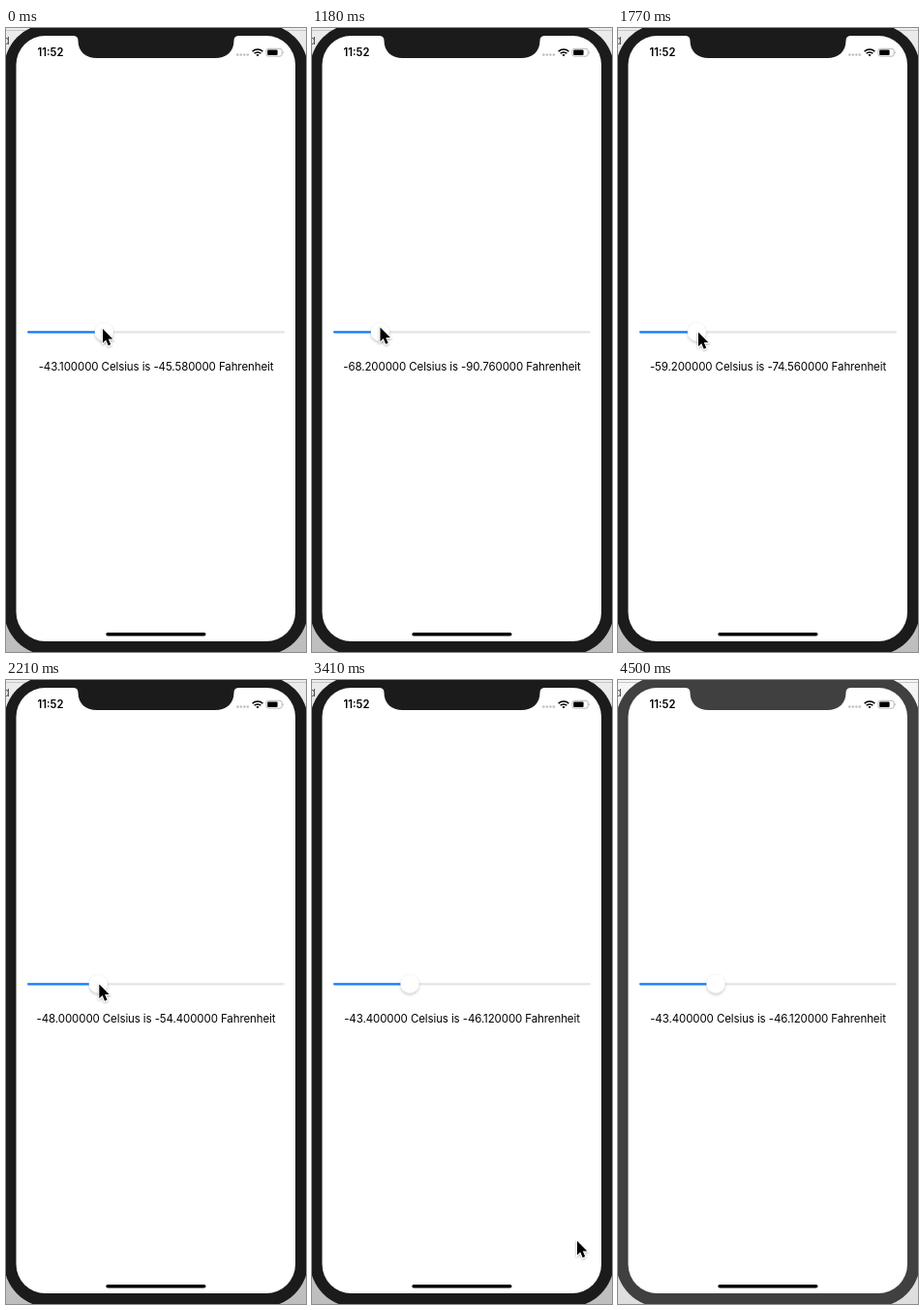
An HTML page for the animation above (4.6 s loop, 310 px wide and 643 px high).

```html
<!DOCTYPE html>
<html lang="en">
<head>
<meta charset="utf-8">
<title>Temperature slider</title>
<style>
  html, body { margin: 0; width: 100%; height: 100%; overflow: hidden; background: #e9e9e9; }
  svg { display: block; width: 100%; height: 100%; font-family: Inter, Roboto, sans-serif; }
</style>
</head>
<body>
<svg viewBox="0 0 310 643">
  <defs>
    <linearGradient id="desk" x1="0" y1="0" x2="0" y2="1">
      <stop offset="0" stop-color="#ececec"/>
      <stop offset=".06" stop-color="#e4e4e4"/>
      <stop offset="1" stop-color="#bebebe"/>
    </linearGradient>
    <filter id="thumbShadow" x="-50%" y="-50%" width="200%" height="200%">
      <feDropShadow dx="0" dy="1.8" stdDeviation="1.5" flood-opacity=".2"/>
    </filter>
    <filter id="arrowShadow" x="-50%" y="-50%" width="200%" height="200%">
      <feDropShadow dx="0" dy="1" stdDeviation=".8" flood-opacity=".35"/>
    </filter>
  </defs>

  <rect width="310" height="643" fill="url(#desk)"/>
  <rect id="veil" width="310" height="643" fill="#fff"/>
  <path d="M0 2.5H310" stroke="#c6c6c6"/>
  <text x="-3" y="17" font-size="11" fill="#444">d</text>

  <g id="bezel">
    <rect x="-2" y="-4" width="314" height="650" rx="46"/>
    <rect x="10.5" y="8" width="288.5" height="624" rx="30" fill="#fff"/>
    <path d="M69 7.5V8Q74.5 8 74.5 13C74.5 24 82 31 94 31H216C228 31 235.5 24 235.5 13Q235.5 8 241 8V7.5Z"/>
  </g>

  <text x="32.5" y="29.2" font-size="11.2" font-weight="600">11:52</text>
  <g fill="#c2c2c2">
    <circle cx="239.3" cy="27.6" r="1.3"/>
    <circle cx="242.8" cy="27.6" r="1.3"/>
    <circle cx="246.3" cy="27.6" r="1.3"/>
    <circle cx="249.8" cy="27.6" r="1.3"/>
  </g>
  <g fill="none" stroke="#000" stroke-width="1.5">
    <path d="M254.6 24.2A7.6 7.6 0 0 1 265.4 24.2M256.6 26.3A4.8 4.8 0 0 1 263.4 26.3"/>
    <path d="M260 29.3L258.4 27.7A2.3 2.3 0 0 1 261.6 27.7Z" fill="#000" stroke="none"/>
  </g>
  <rect x="269" y="21.3" width="16.2" height="7.9" rx="2.3" fill="none" stroke="#a6a6a6" stroke-width=".8"/>
  <rect x="270.2" y="22.5" width="10.4" height="5.5" rx="1.1"/>
  <path d="M286.2 23.8Q287.6 25.2 286.2 26.7Z" fill="#999"/>

  <rect x="22" y="312.2" width="266" height="2.2" rx="1.1" fill="#e4e4e5"/>
  <rect id="filled" x="22" y="312.2" height="2.2" rx="1.1" fill="#0f7dfc"/>
  <circle id="thumb" cy="313" r="9.7" fill="#fff" stroke="#000" stroke-opacity=".06" stroke-width=".5" filter="url(#thumbShadow)"/>
  <text id="reading" x="155" y="352.6" font-size="11.5" letter-spacing="-.1" text-anchor="middle"></text>

  <rect x="103.3" y="623" width="103.2" height="3.5" rx="1.75"/>
  <path id="arrow" d="M0 0V14.6L3.3 11.5L5.7 17.2L8.2 16.1L5.8 10.6H10.4Z"
        stroke="#fff" stroke-width="1.8" paint-order="stroke" filter="url(#arrowShadow)"/>
</svg>
<script>
const LOOP = 4600;
const DRAG_TIMES = [150, 300, 450, 600, 740, 890, 1030, 1180,
                    1330, 1480, 1620, 1770, 1920, 2070, 2210, 2360, 2510];
const LEAVE_TIMES = [2960, 3110, 3260, 3410, 3560, 3710, 3860];
const FADE_TIMES = [4160, 4310, 4500];

// Keys are [step, value, slope per step].
const CELSIUS = [[0, -43.1, -4], [4, -60.8, -3.4], [8, -68.2, 0], [12, -59.2, 3.9], [17, -43.4, 1.2]];
const DRAG_X = [[0, 100, -5], [4, 79, -3.6], [8, 70.5, 0], [12, 83, 4.6], [17, 101.5, 1.2]];
const DRAG_Y = [[0, 310, 0], [4, 311, 0], [8, 308.5, 0], [12, 313.5, 0], [17, 313.5, 0]];
const LEAVE_X = [[0, 101.5, 8], [4, 274, 10], [6, 278, 0], [7, 278, 0]];
const LEAVE_Y = [[0, 313.5, 15], [4, 578, 28], [7, 665, 28]];

const $ = id => document.getElementById(id);
const set = (id, attr, value) => $(id).setAttribute(attr, value);
const stepAt = (times, t) => times.filter(time => time <= t).length;

function curve(keys, step) {
  const i = Math.max(1, keys.findIndex(key => key[0] >= step));
  const [s0, v0, m0] = keys[i - 1];
  const [s1, v1, m1] = keys[i];
  const span = s1 - s0, u = (step - s0) / span, w = 1 - u;
  return v0 * w * w * (1 + 2 * u) + v1 * u * u * (3 - 2 * u)
       + span * u * w * (m0 * w - m1 * u);
}

function draw(t) {
  const drag = stepAt(DRAG_TIMES, t);
  const leave = stepAt(LEAVE_TIMES, t);
  const fade = stepAt(FADE_TIMES, t) / FADE_TIMES.length;

  const celsius = Math.round(curve(CELSIUS, drag) * 10) / 10;
  const fahrenheit = celsius * 1.8 + 32;
  const thumbX = 101 + (celsius + 43.4) * 1.235;
  set('thumb', 'cx', thumbX);
  set('filled', 'width', thumbX - 22);
  $('reading').textContent = `${celsius.toFixed(6)} Celsius is ${fahrenheit.toFixed(6)} Fahrenheit`;

  const x = leave ? curve(LEAVE_X, leave) : curve(DRAG_X, drag);
  const y = leave ? curve(LEAVE_Y, leave) : curve(DRAG_Y, drag);
  set('arrow', 'transform', `translate(${x} ${y})`);

  const shade = Math.round(27 + 37 * fade);
  set('bezel', 'fill', `rgb(${shade},${shade},${shade})`);
  set('veil', 'opacity', fade * 0.5);
}

const start = performance.now();
function tick() {
  draw((performance.now() - start) % LOOP);
  requestAnimationFrame(tick);
}
tick();
</script>
</body>
</html>
```
